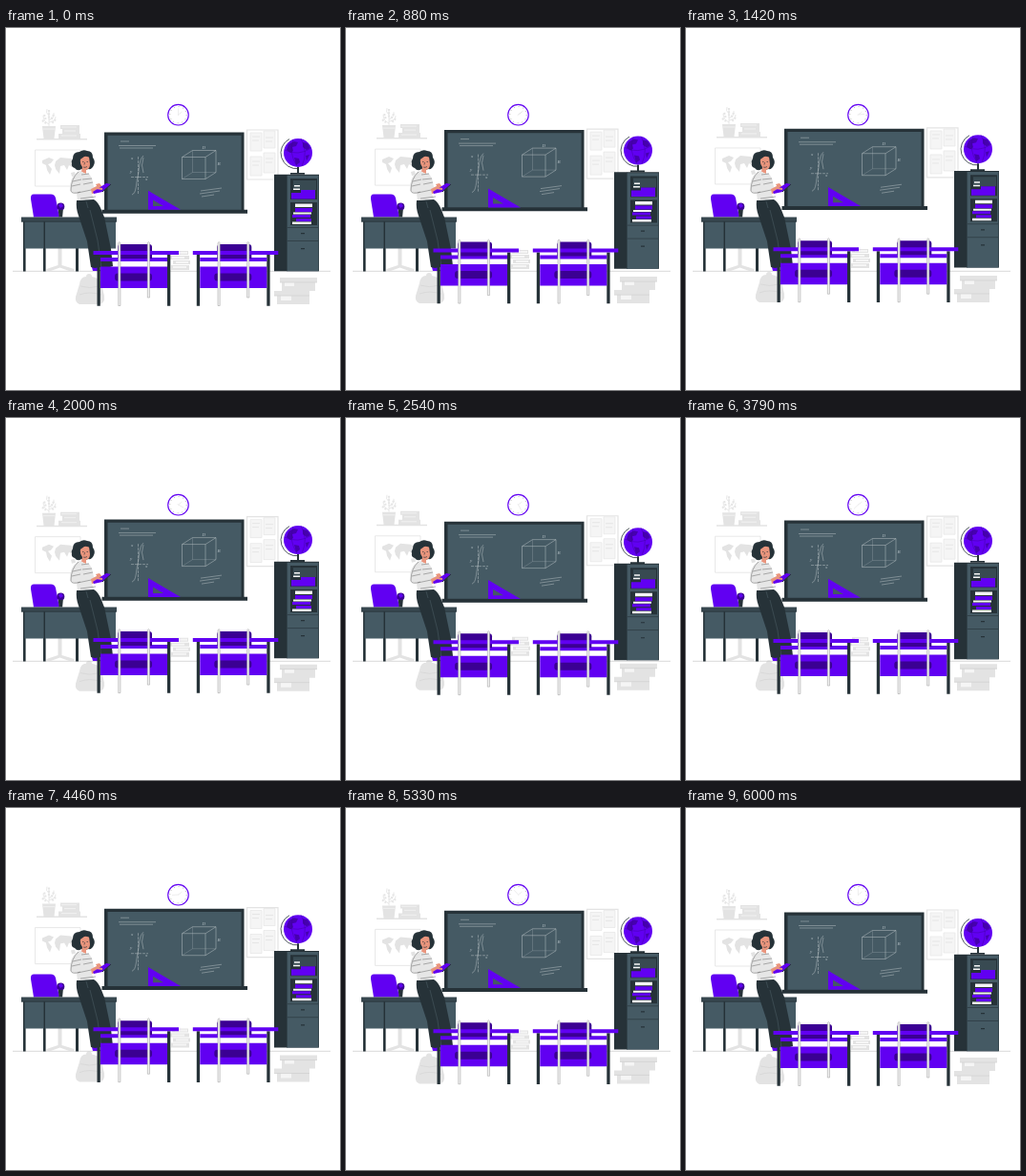
Write an HTML page that moves like this. It is 350 by 380 pixels and loops after 6.04 s.

```html
<!DOCTYPE html>
<html lang="en">
<head>
<meta charset="utf-8">
<title>Classroom</title>
<style>
html, body { margin: 0; width: 100%; height: 100%; overflow: hidden; background: #fff; }
svg { display: block; width: 350px; height: 380px; }
.p { fill: #6100f2; } .q { fill: #3b0093; }
.d { fill: #263238; } .s { fill: #455a64; }
.g { fill: #e3e3e3; } .w { fill: #f5f5f5; } .skin { fill: #e9947c; }
.line { fill: none; stroke: #e3e3e3; stroke-width: .8; }
.ink { fill: none; stroke: #263238; stroke-width: .6; }
.chalk { fill: none; stroke: #e8eced; stroke-width: .5; opacity: .7; }
text { font: italic 5px "Liberation Serif", serif; fill: #b5c0c5; }
</style>
</head>
<body>
<svg viewBox="0 0 350 380">
  <defs>
    <g id="desk">
      <path class="d" d="M95.500 238h3.300v53.700h-3.300zM169 238h3.300v53.700H169z"/>
      <path class="p" d="M99 241h70v4H99zM99 250.500h70V273H99z"/>
      <rect class="q" x="114" y="257.500" width="39" height="8" rx="3"/>
      <path class="q" d="M120 227h30q3 0 3 3v12h-36v-12q0-3 3-3z"/>
      <path class="p" d="M91.500 234H181v4H91.500z"/>
      <path fill="#f0f0f0" stroke="#9b9b9b" stroke-width=".5"
        d="M117.700 225.500q1.200-2 2.200 0v66h-2.200zM148.300 225.500q1.200-2 2.200 0V283h-2.200z"/>
    </g>
  </defs>

  <g id="backdrop">
    <path class="g" d="M32 116h53v1.500H32zM38 103h14l-1.500 13h-11zM57 102h20v4H57zM59 106h18v5H59zM55 111h23v5H55z"/>
    <path class="line" d="M45 103V88m0 13q-6-3-6-9m6 5q6-3 5-8m-5 3q-4-3-2-7m2 14q7-1 7-6"/>
    <path fill="none" stroke="#f7f7f7" stroke-width=".7" d="M39 106h12M58 104h16M61 108h12M58 113h16"/>
    <path d="M45 86v10M40 91l2 6M50 91l-3 6M38 97l4 3M52 96l-4 4" stroke="#e6e6e6" stroke-width="2.200" stroke-dasharray="2 1.200"/>
    <path class="line" d="M30.500 128h47.500v38H30.500z"/>
    <path class="g" d="M38 139l7-3 5 2-3 4-3 1 4 5-2 6-3-5-1-5-4-2zM52 140l5-4 11 1 5 4-4 5-3-2-2 5-3-5-4 1-1 8-4-5-1-4zM68 152l4-1 1 4-4 1z"/>
    <path class="line" style="stroke-width:1.200" d="M252.500 107H285v52h-32.500z"/>
    <path class="w" stroke="#e6e6e6" stroke-width=".7" d="M256 110h12v19h-12zM270 108h12v18h-12zM256 135h12v20h-12zM270 131h12v21h-12z"/>
    <path class="line" d="M258 114h8m-8 4h7M272 115h8m-8 4h7M258 140h8m-8 4h7M272 137h8m-8 4h7"/>
    <path class="g" d="M174 234h17v4h-17zM172 239h20v4h-20zM175 244h18v4h-18zM173 249h19v5h-19z"/>
    <path class="w" d="M177 235h13v2h-13zM174 240h13v2h-13zM178 245h13v2h-13zM175 250h14v2h-14z"/>
    <path class="g" d="M287 262h39v5h-2v9h-35v-9h-2zM281 276h37v14h-34v-9h-3z"/>
    <path class="w" d="M292 267h10v4h-10zM288 281h11v5h-11z"/>
    <path class="line" style="stroke:#d2d2d2" d="M287 267h39M281 281h37"/>
    <path class="g" d="M77 269q1-8 7-8 0-3 3-3t3 3q8 1 10 8l3 12q1 8-5 9H77q-5-2-4-8z"/>
    <path fill="none" stroke="#d2d2d2" stroke-width=".6" d="M78 271q9 3 20 0M77 280q10-4 23 0"/>
  </g>

  <path d="M7 255.300h333" stroke="#c8c8c8" stroke-width=".7"/>

  <circle cx="180.500" cy="91.200" r="10.800" fill="#fff" stroke="#6100f2" stroke-width="1.100"/>
  <circle cx="180.500" cy="91.200" r="8.700" fill="none" stroke="#777" stroke-width=".9" stroke-dasharray=".6 3.955"/>
  <path id="hand" d="M180.500 92V84.500" stroke="#ddd" stroke-width=".5"/>
  <path d="M180.500 91l4-3" stroke="#ddd" stroke-width=".5"/>

  <g class="float">
    <path class="d" d="M103 109.500h146.500v81.200h3.500v4H100.500v-4h2.500z"/>
    <path class="s" d="M106.500 112.700H246.500v78H106.500z"/>
    <g class="chalk">
      <path d="M120 119h9M118 123.500h39M119 126h35"/>
      <path d="M138.500 135v40M131 156.500h18" stroke-dasharray="3 1"/>
      <path d="M132 175c5-2 4-11 6-19s1-17 6-22M144 136q-3 8 0 16"/>
      <path d="M184.500 135.500h24.500v23h-24.500zl11-7H220v23l-11 7M209 135.500l11-7"/>
      <path d="M195.500 128.500v23H220m-24.500 0l-11 7" opacity=".5"/>
      <path d="M204 171l22-3M203 174l21-3M205 177l13-2"/>
    </g>
    <text x="205.500" y="127">D</text><text x="221.500" y="144">B</text>
    <text x="131" y="138">x</text><text x="146" y="160">x</text><text x="130" y="152">y</text>
    <path class="p" fill-rule="evenodd" d="M149 170.800l34 20h-34zM154 180.500v6.500h11z"/>
  </g>

  <g class="float">
    <path class="d" d="M281 153.700h47v101.500h-47z"/>
    <path class="s" d="M294 154.700h33.500v100.500H294z"/>
    <path class="d" d="M298 158h28v22h-28zM298 183h28v24h-28z"/>
    <path class="s" d="M301 160h24v10h-24z" opacity=".6"/>
    <path class="p" d="M299 173h10v-3h15v9.500h-25zM303 189h18v4h-18zM300 196h19v3h-19zM304 200h16v3h-16z"/>
    <path class="w" d="M302 165h6v1.500h-6zM301 168.500h7v1.500h-7zM303 184.500h18v3.500h-18zM301 193.500h19v2h-19zM300 203.500h20v2.500h-20z"/>
    <path class="ink" d="M295 209.500h32M295 223.500h32M294.500 154v101"/>
    <path class="d" d="M309 215h4v1.200h-4zM309 231h4v1.200h-4z"/>
    <path class="d" d="M298 152h15v1.800h-15zM305 146h2v6h-2z"/>
    <path d="M297 116.500a16.500 16.500 0 0 0 10 31" fill="none" stroke="#263238" stroke-width=".8"/>
    <circle class="p" cx="306" cy="131" r="15"/>
    <path class="q" d="M296 122l6-3 4 1-2 4-4 1 1 4-3 2-4-3zM311 120l5 1 3 5-4 2-4-3zM302 136l5 1 1 4-4 3zM314 134l4-1-3 6z" opacity=".7"/>
    <path fill="none" stroke="#3b0093" stroke-width=".4" d="M292 128q14 7 28-2M301 117q-5 15 4 28M309 116q8 14 1 29"/>
  </g>

  <g>
    <path class="g" d="M54.500 231h4v18l13 4v2.500h-4l-11-4-11 4h-3v-2.500l12-4z"/>
    <path class="p" d="M29 174.500h18q4 0 5 4l4 20H29l-3-19q-.5-5 3-5z"/>
    <circle class="q" cx="57.300" cy="187.500" r="4"/>
    <path class="d" d="M54.800 191h5l-.7 7.500h-3.600z"/>
    <path class="p" d="M55 186l3-2 2 3-3 2z"/>
    <path class="d" d="M18 203h2.600v52.500H18zM39 203h2.600v52.500H39zM73 203h3v52.500h-3z"/>
    <path class="s" d="M19.500 203H115v28.500H19.500z"/>
    <path class="d" d="M39.500 203h1.500v29h-1.500z"/>
    <path fill="#37474f" d="M16 198.600h100v4.700H16z"/>
    <path d="M16 203.300h100" stroke="#263238" stroke-width=".7"/>
  </g>

  <g>
    <path class="p" d="M90 251l5-1 2 3 3 2h-9zM101 248l5 1 4 6h-8z"/>
    <path class="d" d="M74 181l18-1q5 3 8 11 4 8 5 17l5 24 2 18-6 2-7-1-6 1-4-1-4-27-9-27q-3-8-2-16z"/>
    <path d="M88 191l8 32 4 29M84 182l2 7" fill="none" stroke="#51626a" stroke-width=".5"/>
    <path class="d" d="M70 137q0-7 7-7 4-3 8-1 6 0 6 7 3 4 1 8-2 5-6 4-4 2-7 0-4 3-7-1-4-1-3-5-1-2 1-5z"/>
    <path class="skin" d="M78 137q4-5 9-2l1 8q0 5-4 6v4l-5-2 1-5q-3-4-2-9z"/>
    <path class="d" d="M76 141q0-8 7-9 6 0 6 5-4-3-7-2-4 2-6 6z"/>
    <path class="ink" d="M80 140.500h1.500m3 0H86M82.500 141l-.5 2.500M81 146q2 1 4-.5"/>
    <path fill="#e6e6e6" d="M75 151l3-1 5 3 3-1q4 4 5 10l1 5 5-1 1 4-8 4 2 5-17 2-1-7q-7-1-7-5 0-13 8-18z"/>
    <path class="ink" style="stroke:#666;stroke-width:.5" d="M70 161l9-2m-10 7l9-2m1-10l8-1m-7 6l10-1m-9 6l10-2m-13 10q-9 3-10-1 0-13 8-20m-1 22l19-4m-16 10l16-2"/>
    <path class="skin" d="M89 169l6-3 4 1-1 5-8 2zM94 164l4-1 3 4-4 2z"/>
    <path class="p" d="M91 172l14-9 5 1-9 8-9 2z"/>
    <path d="M101 172l9-8" stroke="#263238" stroke-width="1"/>
    <path d="M94 168l7 1" stroke="#e9947c" stroke-width="2"/>
  </g>

  <g class="float"><use href="#desk"/><use href="#desk" x="104.300"/></g>
</svg>
<script>
const LOOP = 6040;
const backdrop = document.getElementById("backdrop");
const floats = document.querySelectorAll(".float");
const hand = document.getElementById("hand");
// Vertical sway, starting at its lowest point.
const sway = (turns, rise) => `translate(0 ${(rise * (Math.cos(turns * 2 * Math.PI) - 1) / 2).toFixed(3)})`;

function draw() {
  const u = performance.now() % LOOP / LOOP;
  backdrop.setAttribute("transform", sway(u, 4.5));
  for (const part of floats) part.setAttribute("transform", sway(u * 2, 3.8));
  hand.setAttribute("transform", `rotate(${u * 360} 180.5 91)`);
  requestAnimationFrame(draw);
}
draw();
</script>
</body>
</html>
```
